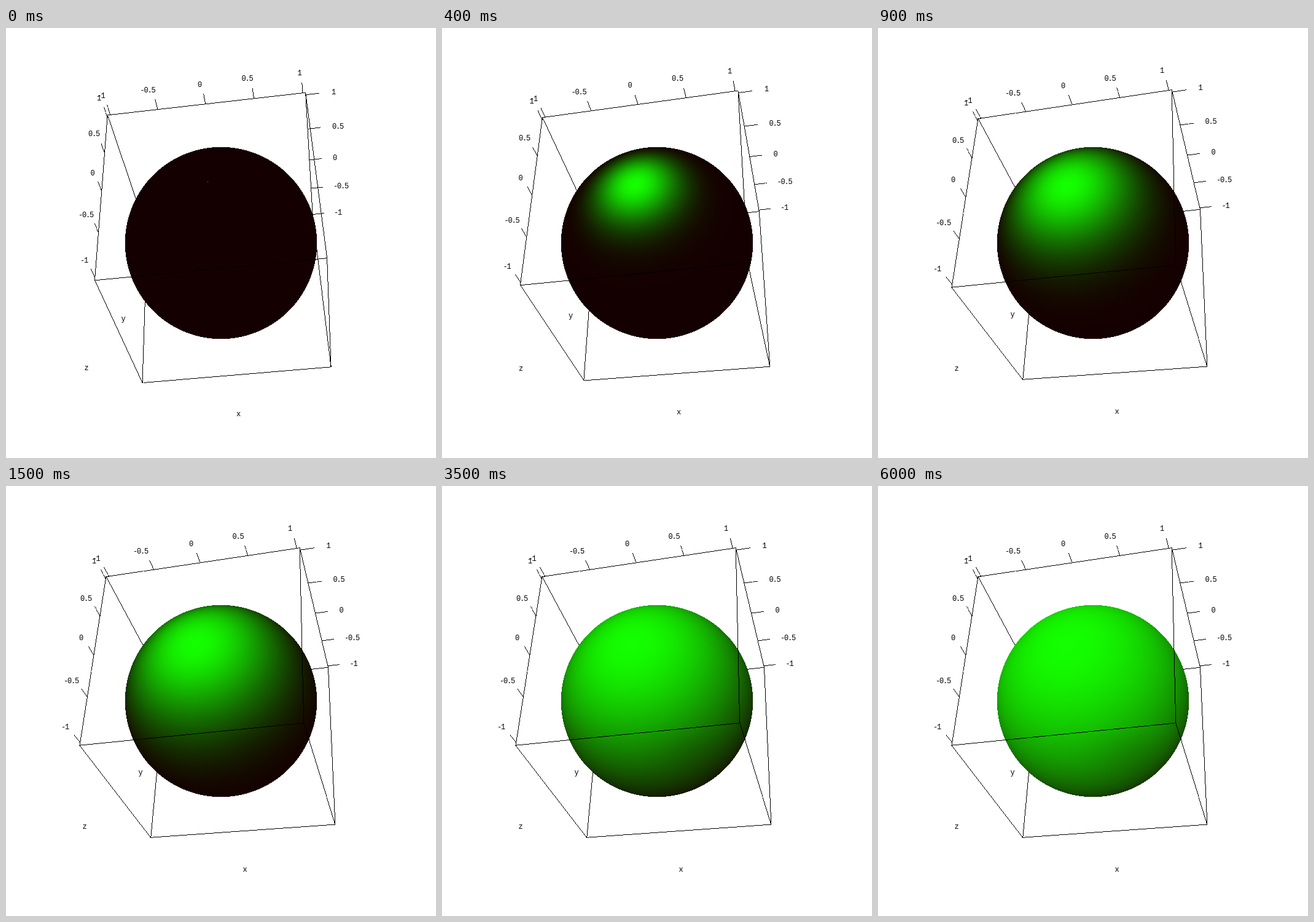
These frames come from a looping animation (700 by 700 pixels, 6.1 s). An HTML page with a canvas:

```html
<!DOCTYPE html>
<html lang="en">
<head>
<meta charset="utf-8">
<title>Heat on a sphere</title>
<style>
html, body { margin: 0; width: 100%; height: 100%; overflow: hidden; background: #fff; }
canvas { display: block; width: 700px; height: 700px; }
</style>
</head>
<body>
<canvas id="stage" width="700" height="700"></canvas>
<script>
const ctx = document.getElementById('stage').getContext('2d');
const LOOP = 6100, STEP = 100;
const MID = 350, FOCAL = 1306, HALF = 158.6, EXPAND = 1.03;
const RADIUS = 155.1, TICK = 2 / 15, TITLE = 1.304;
const RATE = 0.0105;            // diffusion time per step
const BASE_RED = 20;

// Directions of the x and y axes at the two camera positions
const VIEWS = [
  { x: [0.9918, 0.0975, 0.086], y: [-0.0282, 0.8071, -0.5895] },
  { x: [0.968, 0.105, 0.224], y: [0.034, 0.8316, -0.554] }
];

const dot = (a, b) => a[0] * b[0] + a[1] * b[1] + a[2] * b[2];
const cross = (a, b) => [
  a[1] * b[2] - a[2] * b[1],
  a[2] * b[0] - a[0] * b[2],
  a[0] * b[1] - a[1] * b[0]
];
const unit = a => { const n = Math.hypot(...a); return a.map(c => c / n); };
const mix = (a, b, k) => a.map((c, i) => c + (b[i] - c) * k);

function axesAt(k) {
  const x = unit(mix(VIEWS[0].x, VIEWS[1].x, k));
  const rough = mix(VIEWS[0].y, VIEWS[1].y, k);
  const lean = dot(x, rough);
  const y = unit(rough.map((c, i) => c - lean * x[i]));
  return [x, y, cross(x, y)];
}

// Box coordinates (faces at -1 and 1) to screen
function project(axes, p) {
  const q = [0, 1, 2].map(i =>
    HALF * (p[0] * axes[0][i] + p[1] * axes[1][i] + p[2] * axes[2][i]));
  const s = FOCAL / (FOCAL - q[2]);
  return [MID + q[0] * s, MID - q[1] * s];
}

// One-pixel line without smoothing
function line(a, b) {
  const dx = b[0] - a[0], dy = b[1] - a[1];
  const n = Math.max(1, Math.round(Math.max(Math.abs(dx), Math.abs(dy))));
  for (let i = 0; i <= n; i++) {
    ctx.fillRect(Math.floor(a[0] + dx * i / n), Math.floor(a[1] + dy * i / n), 1, 1);
  }
}

function label(text, p, shift) {
  const x = p[0] - 2 + shift * 6 * text.length;
  ctx.fillText(text, Math.round(x * 2) / 2, Math.round(p[1] + 4));
}

// Surface normals for every pixel the ball covers
const LOW = 192, SIZE = 317;
const normals = new Float32Array(SIZE * SIZE * 3);
const covered = new Uint8Array(SIZE * SIZE);
const grain = new Float32Array(SIZE * SIZE);
for (let j = 0, n = 0; j < SIZE; j++) {
  for (let i = 0; i < SIZE; i++, n++) {
    const px = LOW + i, py = LOW + j;
    const dx = (px + 0.5 - MID) / FOCAL, dy = (MID - py - 0.5) / FOCAL;
    const a = dx * dx + dy * dy + 1;
    const disc = FOCAL * FOCAL - a * (FOCAL * FOCAL - RADIUS * RADIUS);
    if (disc < 0) continue;
    const d = (FOCAL - Math.sqrt(disc)) / a;
    covered[n] = 1;
    normals[n * 3] = dx * d / RADIUS;
    normals[n * 3 + 1] = dy * d / RADIUS;
    normals[n * 3 + 2] = (FOCAL - d) / RADIUS;
    // fine weave where the point grid is loose
    const w = Math.exp(-(((px - 405) / 55) ** 2) - ((py - 435) / 38) ** 2);
    grain[n] = (px + 2 * py) % 4 ? 1 : 1 - 0.3 * w;
  }
}

// Spherical heat kernel from the pole, scaled to 0..1, by cosine
const CELLS = 2000;
const ramp = new Float32Array(CELLS + 1);
function fillRamp(t) {
  for (let i = 0; i <= CELLS; i++) {
    const c = 2 * i / CELLS - 1;
    let before = 1, now = c, sum = 1;
    for (let l = 1; l < 40; l++) {
      sum += (2 * l + 1) * Math.exp(-l * (l + 1) * t) * now;
      const next = ((2 * l + 1) * c * now - l * before) / (l + 1);
      before = now;
      now = next;
    }
    ramp[i] = sum;
  }
  const min = ramp[0], span = ramp[CELLS] - min;
  for (let i = 0; i <= CELLS; i++) ramp[i] = Math.max(0, (ramp[i] - min) / span);
}

const ball = document.createElement('canvas');
ball.width = ball.height = SIZE;
const ballCtx = ball.getContext('2d');
const image = ballCtx.createImageData(SIZE, SIZE);

function drawBall(axes, step) {
  const [ax, ay, az] = axes[2];
  if (step) fillRamp(step * RATE);
  else ramp.fill(0);
  for (let n = 0; n < covered.length; n++) {
    if (!covered[n]) continue;
    const c = normals[n * 3] * ax + normals[n * 3 + 1] * ay + normals[n * 3 + 2] * az;
    const cell = Math.max(0, Math.min(CELLS, Math.round((c + 1) / 2 * CELLS)));
    image.data[n * 4] = BASE_RED;
    image.data[n * 4 + 1] = 255 * ramp[cell] * grain[n];
    image.data[n * 4 + 3] = 255;
  }
  ballCtx.putImageData(image, 0, 0);
  ctx.drawImage(ball, LOW, LOW);
  if (!step) {
    const s = RADIUS * FOCAL / (FOCAL - RADIUS * az);
    ctx.fillStyle = '#0d0';
    ctx.fillRect(Math.round(MID + ax * s), Math.round(MID - ay * s), 1, 1);
  }
}

function drawEdges(axes, behind) {
  const hidden = p => p[1] > 0 && p[2] < 0;
  for (let axis = 0; axis < 3; axis++) {
    for (const s of [-1, 1]) for (const t of [-1, 1]) {
      const a = [s, s, s];
      a[(axis + 1) % 3] = t;
      a[axis] = -1;
      const b = a.slice();
      b[axis] = 1;
      if ((hidden(a) || hidden(b)) === behind) line(project(axes, a), project(axes, b));
    }
  }
}

// edge: fixed corner of the axis, out: axis the ticks point along
const SCALES = [
  { axis: 0, edge: [0, 1, 1], out: 2, shift: -0.25 },
  { axis: 1, edge: [-1, 0, 1], out: 2, shift: -0.25 },
  { axis: 2, edge: [1, 1, 0], out: 0, shift: 0.5 }
];
const TITLES = { x: [0, -1, -1], y: [-1, 0, -1], z: [-1, -1, 0] };

function drawScales(axes) {
  for (const { axis, edge, out, shift } of SCALES) {
    for (let v = -1; v <= 1; v += 0.5) {
      const at = k => {
        const p = edge.slice();
        p[axis] = v / EXPAND;
        p[out] += k * TICK;
        return project(axes, p);
      };
      line(at(0), at(1));
      label(String(v), at(2), shift);
    }
  }
  for (const name in TITLES) {
    label(name, project(axes, TITLES[name].map(c => c * TITLE)), -0.13);
  }
}

function draw(step) {
  const axes = axesAt(Math.max(0, Math.min(1, (step - 2) / 3)));
  ctx.fillStyle = '#fff';
  ctx.fillRect(0, 0, 700, 700);
  ctx.fillStyle = '#000';
  drawEdges(axes, true);
  drawBall(axes, step);
  ctx.fillStyle = '#000';
  drawEdges(axes, false);
  drawScales(axes);
}

ctx.font = '12px "Liberation Mono", "DejaVu Sans Mono", monospace';
ctx.letterSpacing = '-1.2px';
ctx.textAlign = 'center';

const start = performance.now();
let shown = -1;
function tick() {
  const step = Math.floor((performance.now() - start) % LOOP / STEP);
  if (step !== shown) draw(shown = step);
  requestAnimationFrame(tick);
}
tick();
</script>
</body>
</html>
```
